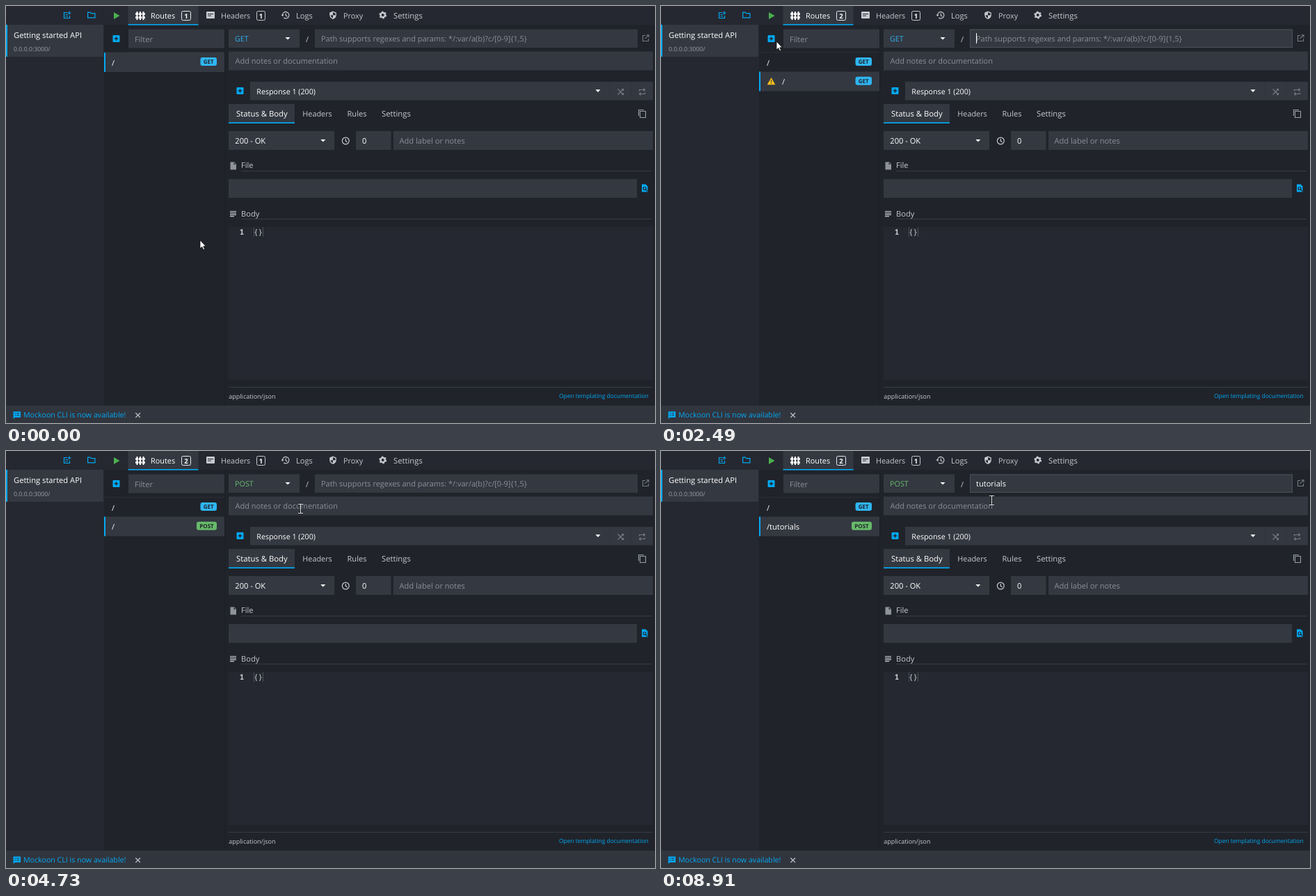
An HTML page for the animation above (9.26 s loop, 933 px wide and 600 px high).

```html
<!DOCTYPE html>
<html lang="en">
<head>
<meta charset="utf-8">
<title>Adding a route</title>
<style>
html, body { margin: 0; width: 100%; height: 100%; overflow: hidden; background: #20232a; }
svg { display: block; width: 933px; height: 600px; font: 11.1px "Open Sans", "Noto Sans", sans-serif; fill: #c6c9cf; text-rendering: geometricPrecision; }
text { white-space: pre; }
.panel { fill: #252830; }
.box { fill: #343841; }
.rule { fill: #383c45; }
.blue { fill: #03a9f4; }
.hint { fill: #8b8f99; }
.lit { fill: #fff; }
.cut { fill: #20232a; }
.line { fill: none; stroke: #c6c9cf; stroke-width: 1.2; }
.dim { fill: none; stroke: #777b85; stroke-width: 1.1; }
.blueline { fill: none; stroke: #03a9f4; stroke-width: 1.2; }
.tag { font-weight: 700; font-size: 8px; fill: #20232a; text-anchor: middle; }
.count { font-weight: 700; font-size: 9.5px; fill: #fff; text-anchor: middle; }
.mono { font: 11px "Noto Sans Mono", "DejaVu Sans Mono", monospace; }
</style>
</head>
<body>
<svg viewBox="0 0 933 600">
  <defs>
    <g id="plus"><rect width="10" height="10" rx="1" class="blue"/><path d="M5 2.3V7.7M2.3 5H7.7" stroke="#20232a" stroke-width="1.4"/></g>
    <path id="down" class="lit" d="M0 0H7L3.5 3.6Z"/>
  </defs>

  <!-- frame -->
  <rect width="933" height="600" fill="#20232a"/>
  <rect class="panel" width="933" height="27"/>
  <rect class="panel" width="141" height="575"/>
  <rect x="314" y="28" width="1" height="547" fill="#1d1f25"/>
  <rect y="575" width="933" height="25" fill="#31353e"/>

  <!-- environment list -->
  <path class="blueline" d="M88 9.5H83.5V17.5H91.5V14M85.5 12.5H89M85.5 15H89M91 7.5V12.5M88.5 10H93.5"/>
  <path class="blueline" d="M117.6 16.9V9.2H121.3L122.5 10.6H127.9V16.9Z"/>
  <rect class="box" y="27" width="140" height="46"/>
  <rect class="blue" y="27" width="2" height="46"/>
  <text class="lit" x="11" y="45.5" font-size="11.2">Getting started API</text>
  <text x="11" y="64.5" font-size="8.75" fill="#9b9fa8">0.0.0.0:3000/</text>

  <!-- top bar -->
  <path d="M155 9V19L163.5 14Z" fill="#4caf50"/>
  <rect class="box" x="175.500" width="101" height="27"/>
  <rect class="blue" x="175.500" y="26" width="101" height="1.600"/>
  <path class="lit" d="M187.500 8h2v12h-2zM192 8h2v12h-2zM196.500 8h2v12h-2z"/>
  <path d="M186.200 11.500H199.800M186.200 16.500H199.800" stroke="#fff" stroke-width="3" stroke-dasharray="4 .8"/>
  <text class="lit" x="208" y="17.700" font-size="10.9">Routes</text>
  <rect x="252.500" y="7.500" width="13" height="13" rx="2" fill="none" stroke="#e8eaee"/>
  <text class="count" id="total" x="259" y="17.500">1</text>
  <rect x="288" y="8" width="12" height="10" rx="1"/>
  <path d="M290 11.500H298M290 14H295" stroke="#252830" stroke-width="1"/>
  <text x="309" y="17.700" font-size="10.8">Headers</text>
  <rect x="360.500" y="7.500" width="12" height="13" rx="2" fill="none" stroke="#c6c9cf"/>
  <text class="count" x="366.500" y="17.500">1</text>
  <path class="line" d="M397.500 13.500A4.700 4.700 0 1 1 399.200 16.800M402.300 10.500V13.800L404.500 15"/>
  <path d="M395.500 12.500H399.700L397.600 15Z"/>
  <text x="417" y="17.700">Logs</text>
  <path d="M470 7.500L474.800 9.500V13C474.800 16 472.800 18 470 19C467.200 18 465.200 16 465.200 13V9.500Z"/>
  <path class="panel" d="M470 9V13.200H473.500V10.500ZM470 13.200V17.500Q467 16 466.500 13.200Z"/>
  <text x="485" y="17.700" font-size="10.8">Proxy</text>
  <circle cx="541.700" cy="13" r="3.200" fill="none" stroke="#c6c9cf" stroke-width="2.400"/>
  <circle cx="541.700" cy="13" r="4.700" fill="none" stroke="#c6c9cf" stroke-width="1.500" stroke-dasharray="2.460"/>
  <text x="557" y="17.700" font-size="11.3">Settings</text>

  <!-- route list -->
  <use href="#plus" x="153.500" y="42"/>
  <rect class="box" x="176" y="33.500" width="138" height="27"/>
  <text class="hint" x="185" y="51.500">Filter</text>
  <rect x="141" y="66" width="173" height="1" fill="#2b2e37"/>
  <g id="firstSelected"><rect class="box" x="141" y="67" width="173" height="28"/><rect class="blue" x="141" y="67" width="2" height="28"/></g>
  <text class="lit" x="152" y="85.500">/</text>
  <rect x="279.500" y="74" width="23.500" height="12" rx="3" fill="#2fb6f3"/>
  <text class="tag" x="291.200" y="83">GET</text>
  <g id="second">
    <rect class="box" x="141" y="94.500" width="173" height="28"/>
    <rect class="blue" x="141" y="94.500" width="2" height="28"/>
    <g id="warning"><path d="M158.500 103L164.300 113.300H152.700Z" fill="#fbc11a"/><path d="M158.500 106.200V109.600M158.500 110.600V111.900" stroke="#343841" stroke-width="1.200"/></g>
    <text class="lit" id="route" y="113.200">/</text>
    <rect id="tagBox" y="101.700" height="12" rx="3"/>
    <text class="tag" id="tagText" y="110.700"></text>
  </g>

  <!-- method and path -->
  <rect class="box" x="320" y="33.500" width="102" height="26.500"/>
  <text id="method" x="329" y="51" font-size="10.8"></text>
  <use href="#down" x="401.500" y="45"/>
  <text x="431" y="51.500">/</text>
  <rect class="box" x="444" y="33.500" width="464" height="26.500"/>
  <rect id="focus" x="444.500" y="34" width="463" height="25.500" fill="none" stroke="#4b505c"/>
  <text class="hint" id="pathHint" x="453" y="51" font-size="10.95">Path supports regexes and params: */:var/a(b)?c/[0-9]{1,5}</text>
  <text class="lit" id="path" x="453" y="51"></text>
  <rect class="lit" id="caret" y="39" width="1" height="15"/>
  <path class="dim" d="M919 42.500H915.500V50.500H923.500V47M920.500 41.700H924V45.200M924 41.700L918.500 47.200"/>
  <rect class="box" x="320" y="65.500" width="610" height="27"/>
  <text class="hint" x="329.500" y="83" font-size="11">Add notes or documentation</text>

  <!-- response -->
  <use href="#plus" x="331.500" y="117"/>
  <rect class="box" x="351" y="109" width="579" height="26.500"/>
  <path d="M867.500 109V135.500M898.500 109V135.500" stroke="#30343d"/>
  <text class="lit" x="360.300" y="126.800" font-size="10.7">Response 1 (200)</text>
  <use href="#down" x="847.500" y="120.300"/>
  <path class="dim" d="M879.500 119.500L887.500 127.500M879.500 127.500L887.500 119.500M885 119.500H887.500V122M885 127.500H887.500V125"/>
  <path class="dim" d="M910.500 122.500V120.500H918M916.500 118.500L918.500 120.500L916.500 122.500M918.500 124.500V126.500H911M912.500 124.500L910.500 126.500L912.500 128.500"/>

  <rect class="box" x="320" y="141" width="95" height="27"/>
  <rect class="blue" x="320" y="167.300" width="95" height="1.700"/>
  <text class="lit" x="331" y="159.200" font-size="11.3">Status &amp; Body</text>
  <text x="426.300" y="159.200" font-size="10.85">Headers</text>
  <text x="490.500" y="159.200">Rules</text>
  <text x="540" y="159.200" font-size="11.3">Settings</text>
  <path d="M909.500 158V149.500H917M911.500 151.500H919.500V160.500H911.500Z" fill="none" stroke="#9a9ea7" stroke-width="1.100"/>

  <rect class="box" x="320" y="180" width="152" height="27"/>
  <text class="lit" x="329.300" y="197.500">200 - OK</text>
  <use href="#down" x="452.300" y="192"/>
  <circle class="line" cx="488.300" cy="194" r="4.900"/>
  <path class="line" d="M488.300 191V194.300L490.500 195.700"/>
  <rect class="box" x="503" y="180" width="50.500" height="27"/>
  <text class="lit" x="512" y="197.500">0</text>
  <rect class="box" x="557" y="180" width="373" height="27"/>
  <text class="hint" x="565.500" y="197.500">Add label or notes</text>

  <path d="M322.500 224.500H328L331 227.500V235.500H322.500Z" fill="#8f939c"/>
  <path class="cut" d="M327.500 225.300V228H330.300Z"/>
  <text x="338" y="233.200">File</text>
  <rect class="rule" x="338" y="237" width="590" height="1"/>
  <rect class="box" x="320" y="249" width="587" height="27"/>
  <path class="blue" d="M914 256.500H919.500L922.500 259.500V267.500H914Z"/>
  <circle cx="918" cy="262.500" r="2" fill="none" stroke="#20232a" stroke-width="1.200"/>
  <path d="M919.400 264L921.800 266.400" stroke="#20232a" stroke-width="1.200"/>

  <path class="line" d="M322 295.500H331M322 297.900H331M322 300.300H331M322 302.700H328"/>
  <text x="338" y="302.500">Body</text>
  <rect class="rule" x="338" y="306" width="590" height="1"/>
  <rect class="panel" x="320" y="318" width="610" height="220"/>
  <text class="mono" x="335.800" y="329.300" style="font-weight:700">1</text>
  <text class="mono" x="356" y="329.300">{}</text>
  <path d="M356.500 318.500V332M369.500 318.500V332" stroke="#555a64" stroke-width=".8"/>
  <rect class="rule" x="320" y="548" width="610" height="1"/>
  <text x="320.300" y="565" font-size="9">application/json</text>
  <text class="blue" x="795" y="563.500" font-size="8.45">Open templating documentation</text>

  <!-- footer -->
  <path class="blue" d="M10.500 583.500H21V592H13L10.500 594Z"/>
  <path d="M12.500 586.200H14M15.200 586.200H19M12.500 589H14M15.200 589H19" stroke="#31353e" stroke-width="1.100"/>
  <text class="blue" x="25" y="592.200" font-size="10.65">Mockoon CLI is now available!</text>
  <path class="line" d="M186.300 585.500L193 592.200M193 585.500L186.300 592.200"/>

  <!-- overlays -->
  <g id="menu">
    <rect x="320.500" y="61.500" width="111" height="174" fill="#343841" stroke="#484d58"/>
    <rect id="hover" x="321" y="87" width="110" height="24.700" fill="#2e323b"/>
  </g>
  <g id="tip">
    <path d="M134.500 9.500H183.500Q186.500 9.500 186.500 12.500V26.500Q186.500 29.500 183.500 29.500H162L158.500 33.500L155 29.500H134.500Q131.500 29.500 131.500 26.500V12.500Q131.500 9.500 134.500 9.500Z" fill="#0b0c0e"/>
    <text class="lit" x="137" y="23" font-size="9.450">Add route</text>
  </g>
  <g id="pointer">
    <g id="ring" fill="none"><circle r="7" stroke="#000" stroke-width="3"/><circle r="7" stroke="#fff" stroke-width="1.300"/></g>
    <path id="arrow" d="M0 0V12L2.800 9.500L4.700 13.700L6.600 12.800L4.700 8.800H8.300Z" fill="#fff" stroke="#000" stroke-width=".7"/>
    <path id="hand" d="M-1.500 1.500a1.500 1.500 0 0 1 3 0V7q1.500-1 2.500.3q1.500-.8 2.300.5q1.800-.4 1.900 1.200V13Q8 15.500 6.300 18.500H-.5Q-2.500 14.500-5.300 11.700Q-5.800 9.600-3.800 9.900L-1.500 12Z" fill="#fff" stroke="#000" stroke-width=".8"/>
    <g id="beam" fill="none"><path d="M-3-6.500H4M.5-6.500V6.500M-3 6.500H4" stroke="#111" stroke-width="2"/><path d="M-3-6.500H4M.5-6.500V6.500M-3 6.500H4" stroke="#e4e6ea" stroke-width="1"/></g>
  </g>
</svg>
<script>
const LOOP = 9260, BLINK = 510;
const ADDED = 2080, BLUR = 3270, OPEN = 3340, CHOSEN = 4330, FOCUS = 5480;
const WORD = "tutorials";
const keys = [6330, 6480, 6670, 6830, 6920, 7070, 7170, 7280, 7380];
const clicks = [[1990, 2140], [3270, 3410], [4250, 4390], [5480, 5560]];
const colors = { GET: "#2fb0ea", POST: "#66bb6a", PUT: "#ffa32b", PATCH: "#f0f2f5", DELETE: "#f77a72", HEAD: "#b58ad6", OPTIONS: "#4ea3ec" };

const smooth = p => p * p * (3 - 2 * p);
const easeIn = p => p ** 1.4;
const easeOut = p => 1 - (1 - p) ** 1.7;

// first step, last step, step count, goal, easing
const moves = [
  [690, 1560, 13, [167, 69], smooth],
  [1630, 1630, 1, [161, 51], smooth],
  [2430, 3080, 10, [356, 48], smooth],
  [3480, 4040, 8, [359, 98], smooth],
  [4530, 4730, 4, [423, 83], easeIn],
  [4800, 5170, 6, [480, 47], easeOut],
  [7920, 8040, 3, [475, 71], smooth]
];
const beamZones = [[176, 33, 314, 61], [444, 33, 908, 60], [320, 65, 930, 93]];
const handZones = [[153, 41, 164, 53], [141, 67, 314, 95], [320, 33, 422, 60]];

const el = id => document.getElementById(id);
const show = (id, on) => { el(id).style.display = on ? "" : "none"; };
const within = (t, [a, b]) => t >= a && t < b;
const inside = (x, y) => ([l, t, r, b]) => x >= l && x < r && y >= t && y < b;
const ramp = (t, a, b) => Math.min(1, Math.max(0, (t - a) / (b - a)));

Object.keys(colors).forEach((name, i) => {
  const item = document.createElementNS("http://www.w3.org/2000/svg", "text");
  item.setAttribute("x", 329);
  item.setAttribute("y", 79 + i * 24.67);
  item.setAttribute("font-size", 10.8);
  item.setAttribute("fill", colors[name]);
  item.textContent = name;
  el("menu").append(item);
});

function pointerAt(t) {
  let pos = [279, 337];
  for (const [from, to, count, goal, ease] of moves) {
    if (t < from) break;
    const step = count > 1 ? Math.floor((t - from) / (to - from) * (count - 1) + 1e-6) + 1 : 1;
    const p = ease(Math.min(1, step / count));
    pos = pos.map((v, i) => v + (goal[i] - v) * p);
  }
  return pos.map(Math.round);
}

function drawPointer(t, menuOpen) {
  const [x, y] = pointerAt(t), hit = inside(x, y);
  const kind = menuOpen || handZones.some(hit) ? "hand" : beamZones.some(hit) ? "beam" : "arrow";
  ["arrow", "hand", "beam"].forEach(k => show(k, k === kind));
  show("ring", clicks.some(c => within(t, c)));
  el("pointer").setAttribute("transform", `translate(${x} ${y})`);
  show("hover", y >= 87);
}

function drawRoute(t, typed) {
  const added = t >= ADDED, chosen = t >= CHOSEN, name = chosen ? "POST" : "GET";
  const width = chosen ? 29 : 23.5;
  show("firstSelected", !added);
  show("second", added);
  show("warning", !chosen);
  el("total").textContent = added ? 2 : 1;
  el("route").textContent = "/" + typed;
  el("route").setAttribute("x", chosen ? 152 : 174);
  el("tagBox").setAttribute("x", 303 - width);
  el("tagBox").setAttribute("width", width);
  el("tagBox").setAttribute("fill", chosen ? colors.POST : "#2fb6f3");
  el("tagText").setAttribute("x", 303 - width / 2);
  el("tagText").textContent = el("method").textContent = name;
  el("method").setAttribute("fill", colors[name]);
}

function drawPath(t, typed) {
  const focused = within(t, [ADDED, BLUR]) || t >= FOCUS;
  const since = [ADDED, FOCUS, ...keys].filter(k => k <= t).pop();
  el("path").textContent = typed;
  show("pathHint", !typed);
  show("focus", focused);
  show("caret", focused && Math.floor((t - since) / BLINK) % 2 === 0);
  el("caret").setAttribute("x", Math.round(453 + (typed ? el("path").getComputedTextLength() : 0)));
}

function render(t) {
  const typed = WORD.slice(0, keys.filter(k => k <= t).length);
  const menuOpen = within(t, [OPEN, CHOSEN]);
  drawRoute(t, typed);
  drawPath(t, typed);
  show("menu", menuOpen);
  el("tip").style.opacity = 0.96 * ramp(t, 1590, 1700) * (1 - ramp(t, 2090, 2230));
  drawPointer(t, menuOpen);
}

const start = performance.now();
function tick() {
  render((performance.now() - start) % LOOP);
  requestAnimationFrame(tick);
}
tick();
</script>
</body>
</html>
```
